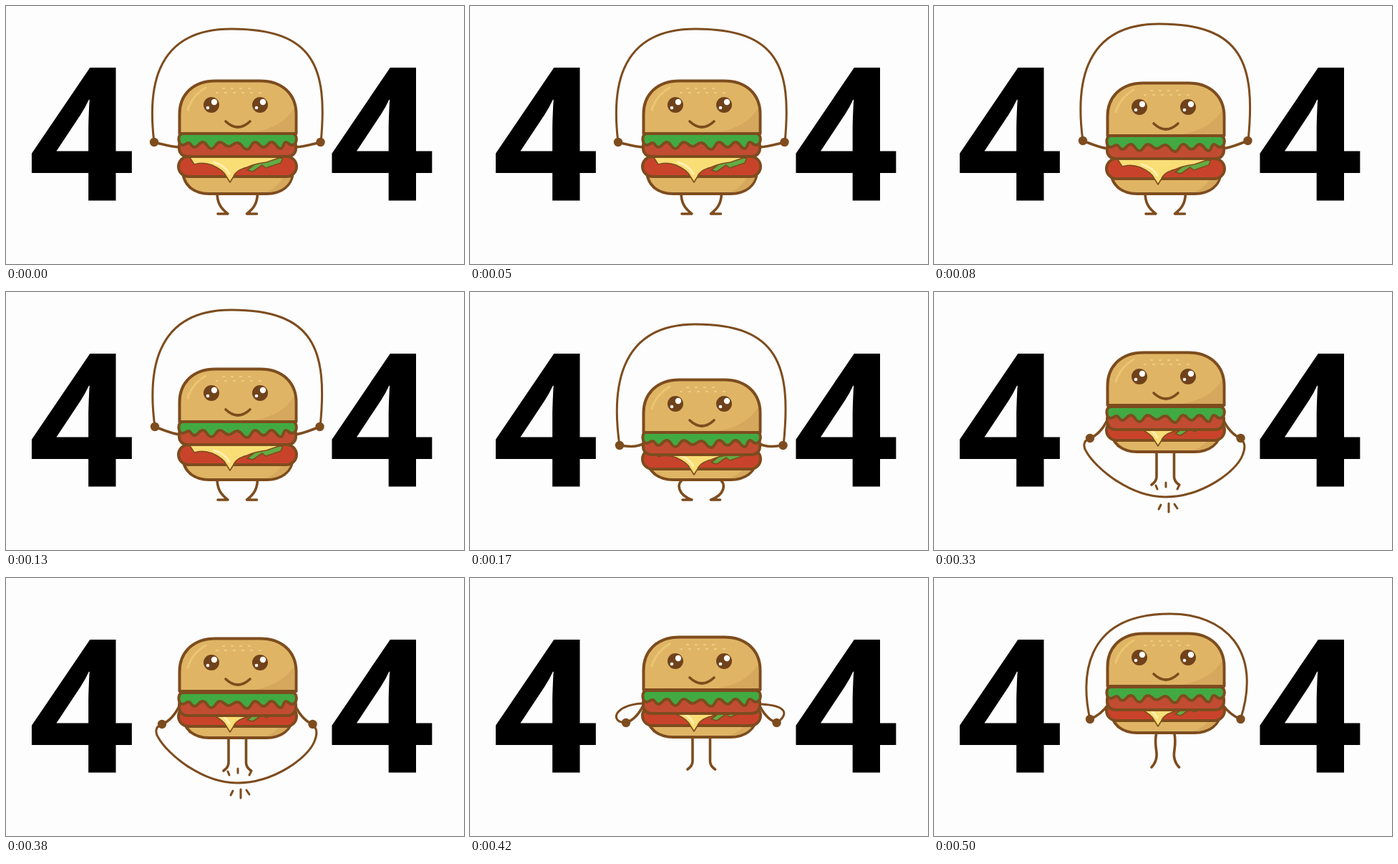
Recreate the animation shown at these times as an HTML page. Size 640x360 px, loop 580 ms.

```html
<!DOCTYPE html>
<html lang="en">
<head>
<meta charset="utf-8">
<title>404</title>
<style>
  html, body { margin: 0; width: 100%; height: 100%; overflow: hidden; background: #fdfdfd; }
  svg { display: block; width: 100%; height: 100%; }
  text { font: 700 260px "Open Sans", "Noto Sans", sans-serif; }
  .line { fill: none; stroke: #7d4c1e; stroke-width: 3.6; stroke-linecap: round; stroke-linejoin: round; }
  .part { stroke: #7d4c1e; stroke-width: 4; stroke-linejoin: round; }
  .thin { stroke-width: 1.6; }
  .bun { fill: #dfb565; }
</style>
</head>
<body>
<svg viewBox="0 0 640 360">
  <defs>
    <g id="eye">
      <circle r="11" fill="#70421b"/>
      <circle cx="4" cy="-4" r="4.2" fill="#fff"/>
      <circle cx="-5" cy="4" r="2.3" fill="#fff"/>
    </g>
  </defs>
  <text x="31.5" y="271.5">4</text>
  <text x="451" y="271.5">4</text>

  <g id="limbs">
    <path id="leg" class="line"/>
    <path id="arm" class="line"/>
    <circle id="hand" r="6.2" fill="#7d4c1e"/>
  </g>
  <use href="#limbs" transform="translate(646.5) scale(-1 1)"/>

  <g id="base">
    <path class="part bun" d="M247 232C249 252 264 262 284 262H364C384 262 399 252 401 232Z"/>
    <path d="M398 240C394 253 380 260 362 260C376 255 382 248 386 240Z" fill="#d5a85d"/>
  </g>
  <g id="tomato">
    <rect class="part" x="241" y="210" width="165" height="28" rx="14" fill="#c9432b"/>
    <path class="part thin" fill="#62ad43" d="M337 229L350 219L387 211L384 219L363 226L358 222L345 231Z"/>
    <path class="part thin" fill="#f9de76" d="M256 210L263 221Q275 217 288 222Q304 229 308 238L313 246L318 238Q321 229 337 225Q347 220 364 218L387 210Z"/>
    <path d="M290 218Q306 222 312 234" fill="none" stroke="#fcefb0" stroke-width="3" stroke-linecap="round"/>
  </g>
  <g id="filling">
    <rect class="part" x="242" y="184" width="163" height="26" rx="11" fill="#c24c32"/>
    <path id="lettuce" class="part" fill="#42aa42"/>
  </g>
  <g id="top">
    <path class="part bun" d="M242.5 178V151C242.5 123 262 104.500 293 104.500H355C386 104.500 405.500 123 405.500 151V178Z"/>
    <path d="M403 142Q386 170 345 176H403Z" fill="#d5a85d"/>
    <path d="M254 145Q260 125 279 114" fill="none" stroke="#ebc672" stroke-width="3" stroke-linecap="round"/>
    <path d="M293 121H360M302 115H350" fill="none" stroke="#ecca85" stroke-width="2" stroke-dasharray="4 8"/>
    <use href="#eye" x="287" y="138"/>
    <use href="#eye" x="355" y="138"/>
    <path class="line" d="M307 161Q324 177 341 161"/>
  </g>
  <path id="rope" class="line" style="stroke-width:3"/>
  <path id="sparks" class="line" style="stroke-width:3" d="M317 297L314 303M328 295V307M336 296L340 302M324 266V272M310 270L312 275M343 269L340 275"/>
</svg>
<script>
const $ = id => document.getElementById(id);

// Scalloped edge, flat at every crest and dip
function wave(points) {
  let [px, py] = points[0];
  return points.slice(1).map(([x, y]) => {
    const mid = (px + x) / 2, part = `C${mid} ${py} ${mid} ${y} ${x} ${y}`;
    [px, py] = [x, y];
    return part;
  }).join("");
}
$("lettuce").setAttribute("d", "M247 178H400C408 178 408 194 399 194" + wave([
  [399, 194], [391, 190], [384, 199], [371, 190], [360, 197], [348, 190], [337, 200], [323, 191],
  [311, 196], [299, 190], [287, 199], [275, 190], [263, 197], [255, 191], [247, 194]
]) + "C240 194 239 178 247 178Z");

// Rope arching overhead from hand to hand
function arch(x, y, top) {
  const k = y - top;
  return `M${x} ${y}C199 ${y - .41 * k} 202 ${top} 315 ${top}C430 ${top} 450 ${top + .335 * k} ${647 - x} ${y}`;
}

const standing = "M295 260C295 275 300 282 310 290H296";
// until: end time; shift: top, filling, tomato, base; arm: hand x, hand y, bend y, shoulder y
const poses = [
  { until: 80, shift: [0, 0, 0, 0], arm: [207, 190, 197, 197], leg: standing, rope: arch(207, 190, 32) },
  { until: 170, shift: [3, 3, 3, 0], arm: [208, 188, 198, 199], leg: standing, rope: arch(208, 188, 25) },
  { until: 250, shift: [18, 17, 9, 0], arm: [209, 214, 218, 211],
    leg: "M299 260C287 268 291 283 310 290H297", rope: arch(209, 214, 45) },
  { until: 330, shift: [24, 21, 9, -2], arm: [217, 228, 227, 220],
    leg: "M299 258C294 270 298 284 311 290H298",
    rope: "M217 228C200 224 200 214 222 213C280 212 310 203 380 203C425 201 451 203 448 211Q445 219 431 228" },
  { until: 420, shift: [-20, -18, -31, -39], arm: [218, 204, 198, 177], sparks: true,
    leg: "M311 222V258Q311 264 304 269",
    rope: "M218 204C207 208 209 217 213 223C226 246 274 286 323 286C374 286 422 251 431 228Q438 211 428 205" },
  { until: 500, shift: [-22, -21, -32, -40], arm: [218, 202, 197, 176],
    leg: "M311 221V256Q311 262 304 267",
    rope: "M218 202C195 202 200 177 241 175M407 176C440 178 448 188 428 203" },
  { until: 580, shift: [-27, -26, -39, -46], arm: [218, 197, 191, 177],
    leg: "M311 215C307 232 312 240 311 249Q310 258 304 264",
    rope: "M218 197C206 145 205 50 330 50C405 50 460 100 428 198" }
];

function draw() {
  const time = performance.now() % 580;
  const { shift, arm: [x, y, bend, shoulder], leg, rope, sparks } = poses.find(p => time < p.until);
  ["top", "filling", "tomato", "base"].forEach((id, i) =>
    $(id).setAttribute("transform", `translate(0 ${shift[i]})`));
  $("leg").setAttribute("d", leg);
  $("arm").setAttribute("d", `M${x} ${y}Q233 ${bend} 243 ${shoulder}`);
  $("hand").setAttribute("cx", x);
  $("hand").setAttribute("cy", y);
  $("rope").setAttribute("d", rope);
  $("sparks").style.display = sparks ? "" : "none";
  requestAnimationFrame(draw);
}
draw();
</script>
</body>
</html>
```
